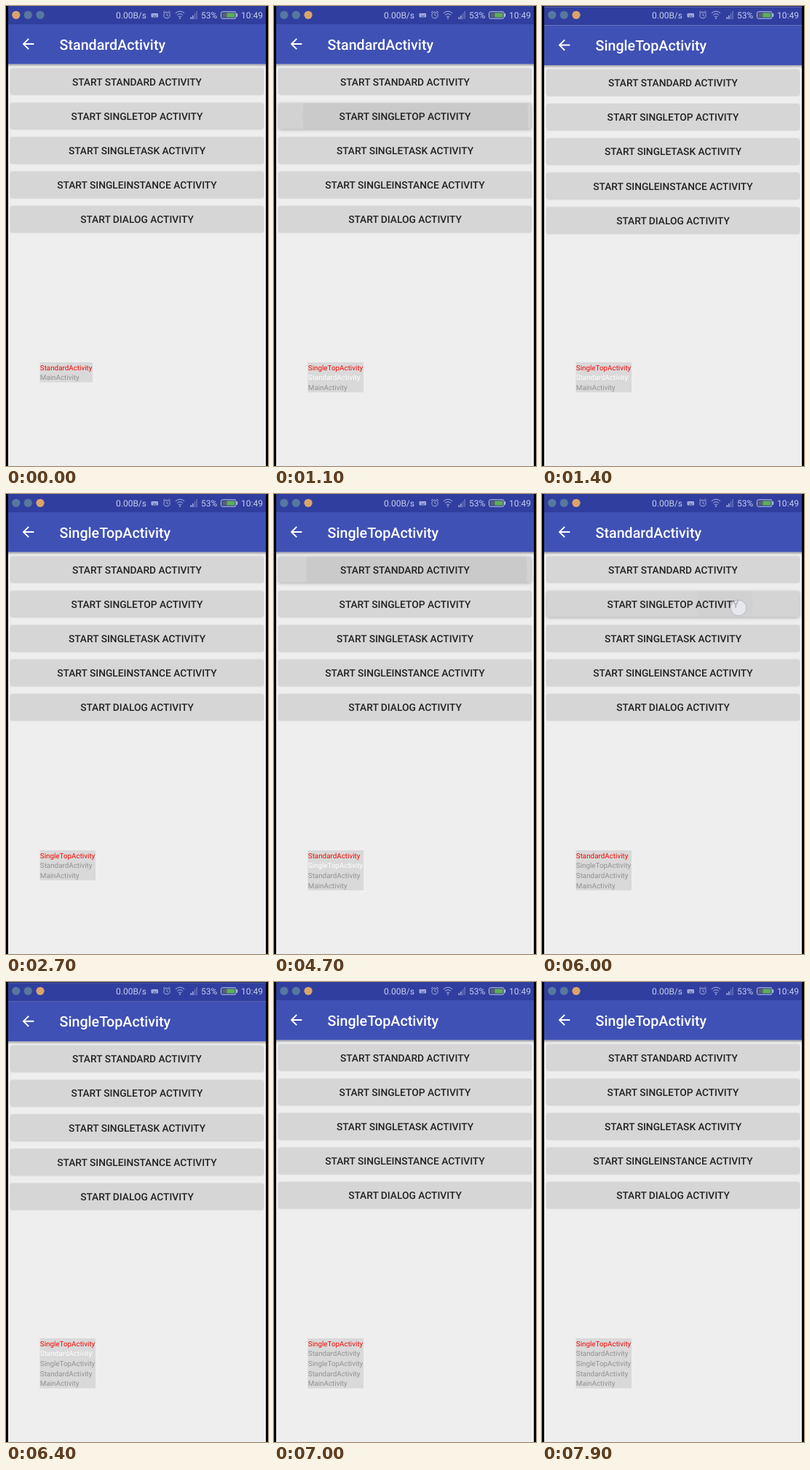
An HTML page that plays this animation: 360 by 630 pixels, repeating every 8000 ms.

```html
<!DOCTYPE html>
<html lang="en">
<head>
<meta charset="utf-8">
<title>Activity stack</title>
<style>
  html, body { margin: 0; width: 100%; height: 100%; overflow: hidden; background: #000; }
  svg { display: block; width: 100%; height: 100%; font-family: Roboto, sans-serif; }
  text { text-rendering: geometricPrecision; }
  .title { font-size: 19.67px; font-weight: 500; fill: #fff; }
  .label { font-size: 13.77px; font-weight: 500; fill: #222; text-anchor: middle; }
  .status { font-size: 12px; fill: #c6cceb; }
  .row { font-size: 9.83px; }
  .button { fill: #d6d6d6; filter: drop-shadow(0 .8px .9px rgba(0,0,0,.22)); }
  .button.down { filter: drop-shadow(0 1.5px 2px rgba(0,0,0,.28)); }
  .line { fill: none; stroke: #a9b2de; stroke-width: 1; }
</style>
</head>
<body>
<svg id="stage" viewBox="0 0 360 630">
  <defs>
    <linearGradient id="shade" x2="0" y2="1">
      <stop offset="0" stop-opacity=".32"/>
      <stop offset="1" stop-opacity="0"/>
    </linearGradient>
  </defs>
</svg>
<script>
const LOOP = 8000;
const STD = 'StandardActivity', TOP = 'SingleTopActivity', MAIN = 'MainActivity';
const KINDS = ['STANDARD', 'SINGLETOP', 'SINGLETASK', 'SINGLEINSTANCE', 'DIALOG'];
const PITCH = 47.2, ROW = 13.7, SLIDE = 350;

// list: stack grows; open: new page slides in; stop: the covered activity turns grey
const STARTS = [
  { name: TOP, list: 1090, open: 1225, stop: 1700 },
  { name: STD, list: 4690, open: 4800, stop: 5400 },
  { name: TOP, list: 6130, open: 6230, stop: 6750 }
];
const TAPS = [
  { down: 830, up: 990, row: 1 },
  { down: 2230, up: 2390, row: 1 },
  { down: 2830, up: 2990, row: 1 },
  { down: 3220, up: 3360, row: 1 },
  { down: 4440, up: 4600, row: 0 },
  { down: 5950, up: 6070, row: 1 },
  { down: 7270, up: 7430, row: 1 }
];
const TOUCH_X = 270;

const stage = document.getElementById('stage');
const clamp = v => Math.max(0, Math.min(1, v));

function add(parent, tag, attrs = {}, text) {
  const el = document.createElementNS('http://www.w3.org/2000/svg', tag);
  set(el, attrs);
  if (text) el.textContent = text;
  parent.append(el);
  return el;
}

function set(el, attrs) {
  for (const key in attrs) el.setAttribute(key, attrs[key]);
}

function rect(parent, x, y, width, height, fill, more = {}) {
  return add(parent, 'rect', { x, y, width, height, fill, ...more });
}

function makePage(id) {
  const g = add(stage, 'g');
  rect(g, 3, 0, 354, 630, '#eee');
  rect(g, 3, 79.5, 354, 4, 'url(#shade)');
  rect(g, 3, 0, 354, 25, '#303f9f');
  rect(g, 3, 25, 354, 54.5, '#3f51b5');
  add(g, 'path', {
    d: 'M20 11H7.83l5.59-5.59L12 4l-8 8 8 8 1.41-1.41L7.83 13H20z',
    transform: 'translate(18.7 40.2) scale(.983)', fill: '#fff'
  });
  const title = add(g, 'text', { x: 73.6, y: 59.7, class: 'title' });
  const buttons = KINDS.map((kind, i) => {
    const y = 85.7 + i * PITCH;
    const box = { x: 6.5, y, width: 347, height: 35.6, rx: 2 };
    const clip = add(add(g, 'clipPath', { id: `clip-${id}-${i}` }), 'rect', box);
    const base = add(g, 'rect', { ...box, class: 'button' });
    const tint = add(g, 'rect', { ...box, 'fill-opacity': 0 });
    const wave = add(add(g, 'g', { 'clip-path': `url(#clip-${id}-${i})` }),
      'circle', { cy: y + 18, r: 0, 'fill-opacity': 0 });
    add(g, 'text', { x: 180, y: y + 22.8, class: 'label' }, `START ${kind} ACTIVITY`);
    return { base, tint, wave };
  });
  return { g, title, buttons };
}

function makeStatus() {
  const g = add(stage, 'g');
  const dots = [13.8, 30.3, 47].map(cx => add(g, 'circle', { cx, cy: 12.3, r: 5.6 }));
  const text = (x, s) => add(g, 'text', { x, y: 17.1, class: 'status' }, s);
  text(151, '0.00B/s');
  text(268, '53%');
  text(323, '10:49');
  rect(g, 199.5, 10, 9.5, 5.5, '#a9b2de', { rx: 1 });
  add(g, 'path', { d: 'M201.5 12h1m1.5 0h1m1.5 0h1M202 14h5', stroke: '#303f9f', 'stroke-width': .9 });
  add(g, 'circle', { cx: 221, cy: 12.6, r: 4.1, class: 'line' });
  add(g, 'path', { d: 'M221 10.1v2.7l1.8 1M216 9l2.6-2.2M226 9l-2.6-2.2', class: 'line' });
  add(g, 'path', { d: 'M232.8 9.8q6.2-5.2 12.4 0M234.9 12.4q4.1-3.4 8.2 0M236.9 14.8q2.1-1.6 4.2 0', class: 'line' });
  add(g, 'circle', { cx: 239, cy: 16.8, r: 1, fill: '#a9b2de' });
  [3, 5, 8, 11].forEach((h, i) =>
    rect(g, 253.5 + i * 2.6, 18 - h, 1.5, h, '#b9c0e6', { opacity: i < 2 ? .9 : .4 }));
  rect(g, 295.5, 7.8, 20.5, 9.4, 'none', { rx: 2, stroke: '#c4c9e2', 'stroke-width': 1 });
  rect(g, 316.5, 10.3, 1.6, 4.4, '#c4c9e2');
  rect(g, 297.2, 9.5, 17, 6, '#56606f');
  rect(g, 303.5, 9.5, 10.8, 6, '#5fae58');
  return dots;
}

const back = makePage('back'), front = makePage('front');
const dots = makeStatus();
const panel = rect(stage, 46.5, 488, 72, 27, '#000', { 'fill-opacity': .09 });
const rows = Array.from({ length: 5 }, (_, i) =>
  add(stage, 'text', { x: 46.8, y: 498.6 + i * ROW, class: 'row' }));
const finger = add(stage, 'circle', {
  cx: TOUCH_X, r: 10.8, fill: '#f2f3fa', 'fill-opacity': .68,
  stroke: '#a9abb4', 'stroke-opacity': .75, 'stroke-width': 1
});
rect(stage, 0, 0, 3, 630, '#000');
rect(stage, 357, 0, 3, 630, '#000');

function drawButtons(page, tap, t) {
  page.buttons.forEach(({ base, tint, wave }, i) => {
    const on = tap && tap.row === i;
    const age = on ? t - tap.down : 0;
    const fade = on ? clamp(age / 120) * (1 - clamp((t - tap.up - 110) / 150)) : 0;
    const grow = 1 - (1 - clamp(age / 450)) ** 2;
    base.classList.toggle('down', !!on && t < tap.up + 180);
    set(tint, { 'fill-opacity': .02 * fade });
    set(wave, {
      cx: TOUCH_X + (180 - TOUCH_X) * grow,
      r: 184 * grow,
      'fill-opacity': .04 * fade
    });
  });
}

function drawPages(t) {
  const opened = STARTS.filter(s => t >= s.open);
  const last = opened[opened.length - 1];
  const age = last ? t - last.open : SLIDE;
  const sliding = age < SLIDE;
  const names = [STD, ...opened.map(s => s.name)];
  if (sliding) {
    set(front.g, {
      visibility: 'visible',
      opacity: 1 - (1 - clamp(age / 200)) ** 4,
      transform: `translate(0 ${50.4 * (1 - age / SLIDE) ** 5})`
    });
    front.title.textContent = names.pop();
  } else {
    set(front.g, { visibility: 'hidden' });
  }
  back.title.textContent = names.pop();
  // the covered page dims while the new one arrives
  set(back.g, { opacity: sliding ? 1 - .3 * clamp(age / 217) : 1 });

  const tap = TAPS.find(p => t >= p.down && t < p.up + 260);
  drawButtons(back, tap, t);
  const touching = tap && t < tap.up;
  set(finger, {
    visibility: touching ? 'visible' : 'hidden',
    cy: tap ? 108.8 + tap.row * PITCH : 0
  });
}

function drawStack(t) {
  const started = STARTS.filter(s => t >= s.list);
  const last = started[started.length - 1];
  const stack = [MAIN, STD, ...started.map(s => s.name)].reverse();
  const paused = last && t < last.stop;
  set(panel, { width: started.length ? 76.5 : 72.5, height: stack.length * ROW });
  rows.forEach((row, i) => {
    row.textContent = stack[i] || '';
    set(row, { fill: i === 0 ? '#f60a04' : i === 1 && paused ? '#fff' : '#929292' });
  });
}

function draw(t) {
  const orange = t < 200 ? 0 : 2;
  dots.forEach((dot, i) => set(dot, { fill: i === orange ? '#dba36c' : '#56789f' }));
  drawPages(t);
  drawStack(t);
}

const begin = performance.now();
function tick() {
  draw((performance.now() - begin) % LOOP);
  requestAnimationFrame(tick);
}
tick();
</script>
</body>
</html>
```
